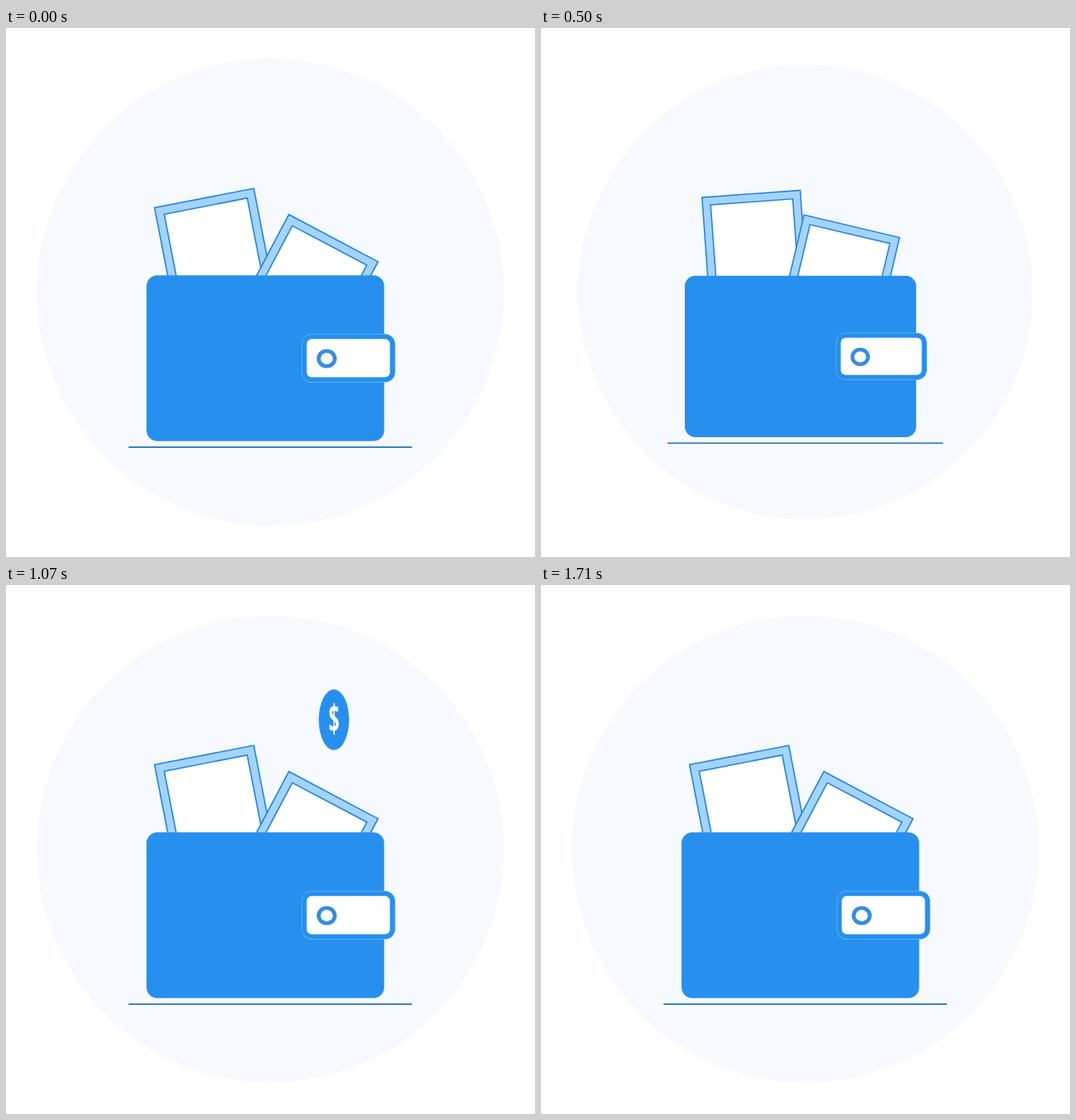
Animation of 640 by 640 pixels, one loop 2.07 s. Source, as an HTML page:

```html
<!DOCTYPE html>
<html lang="en">
<head>
<meta charset="utf-8">
<title>Wallet</title>
<style>
  html, body { margin: 0; width: 100%; height: 100%; overflow: hidden; background: #fff; }
  svg { display: block; width: 100%; height: 100%; }
  .card rect { stroke: #1e86e0; stroke-width: 1.6; }
  .frame { fill: #a5d3ff; }
  .paper { fill: #fff; }
  .blue { fill: #278fed; }
  text { font: 700 46px "Open Sans", "Noto Sans", sans-serif; fill: #fff; text-anchor: middle; }
</style>
</head>
<body>
<svg viewBox="0 0 640 640">
  <g id="scene">
    <circle cx="319.75" cy="319.5" r="282.7" fill="#f6faff"/>
    <g id="coin">
      <circle class="blue" r="36.7"/>
      <text y="15.6">$</text>
    </g>
    <g id="left" class="card">
      <g transform="translate(179.7 217.4) rotate(-11)">
        <rect class="frame" width="122.3" height="135"/>
        <rect class="paper" x="10" y="10" width="102.3" height="115"/>
      </g>
    </g>
    <g id="right" class="card">
      <g transform="translate(342.2 225.7) rotate(27.9)">
        <rect class="frame" width="122" height="135"/>
        <rect class="paper" x="10" y="10" width="102" height="115"/>
      </g>
    </g>
    <rect class="blue" x="170" y="299.2" width="287.5" height="200.5" rx="13"/>
    <rect x="357.7" y="370" width="113" height="58.8" rx="12.5" fill="#8cc4f6"/>
    <rect class="blue" x="358.2" y="370.5" width="112.4" height="57.8" rx="12"/>
    <rect x="363.8" y="376.3" width="100.7" height="46.2" rx="6" fill="#fff"/>
    <ellipse cx="388" cy="400" rx="9.8" ry="9.2" fill="#f6faff" stroke="#378cdf" stroke-width="4.6"/>
    <path d="M148.3 507.2H491" stroke="#2273b8" stroke-width="1.7"/>
  </g>
</svg>
<script>
  const LOOP = 2070, FPS = 14;
  const CX = 319.75, CY = 319.5;
  const el = id => document.getElementById(id);
  const scene = el("scene"), coin = el("coin"), left = el("left"), right = el("right");

  const progress = (k, from, to) => Math.min(1, Math.max(0, (k - from) / (to - from)));
  const ease = (k, from, to) => {
    const u = progress(k, from, to);
    return u * u * (3 - 2 * u);
  };
  // Goes 0 to 1, then back to 0
  const squeeze = (k, a, b, c, d) => ease(k, a, b) - ease(k, c, d);

  function draw(ms) {
    const k = Math.floor((ms + 5) * FPS / 1000);

    const scale = 1 - 0.0265 * squeeze(k, 0, 5.2, 7, 11);
    scene.setAttribute("transform",
      `translate(${CX} ${CY}) scale(${scale}) translate(${-CX} ${-CY})`);

    left.setAttribute("transform", `rotate(${6.84 * squeeze(k, 0, 5.8, 7, 13.15)} 315.7 307.5)`);
    right.setAttribute("transform", `rotate(${-14.6 * squeeze(k, 2.3, 7, 7, 13.9)} 322 318.5)`);

    const y = 145.6 + 130 * (1 - progress(k, 11, 18)) ** 2.37;
    const turn = ease(k, 12, 18);
    const fade = 1 - progress(k, 19, 24);
    coin.setAttribute("transform", `translate(396.7 ${y}) scale(${Math.max(turn, 0.001)} 1)`);
    coin.setAttribute("opacity", turn > 0 ? fade : 0);
  }

  let start;
  function tick(now) {
    start ??= now;
    draw((now - start) % LOOP);
    requestAnimationFrame(tick);
  }
  draw(0);
  requestAnimationFrame(tick);
</script>
</body>
</html>
```
